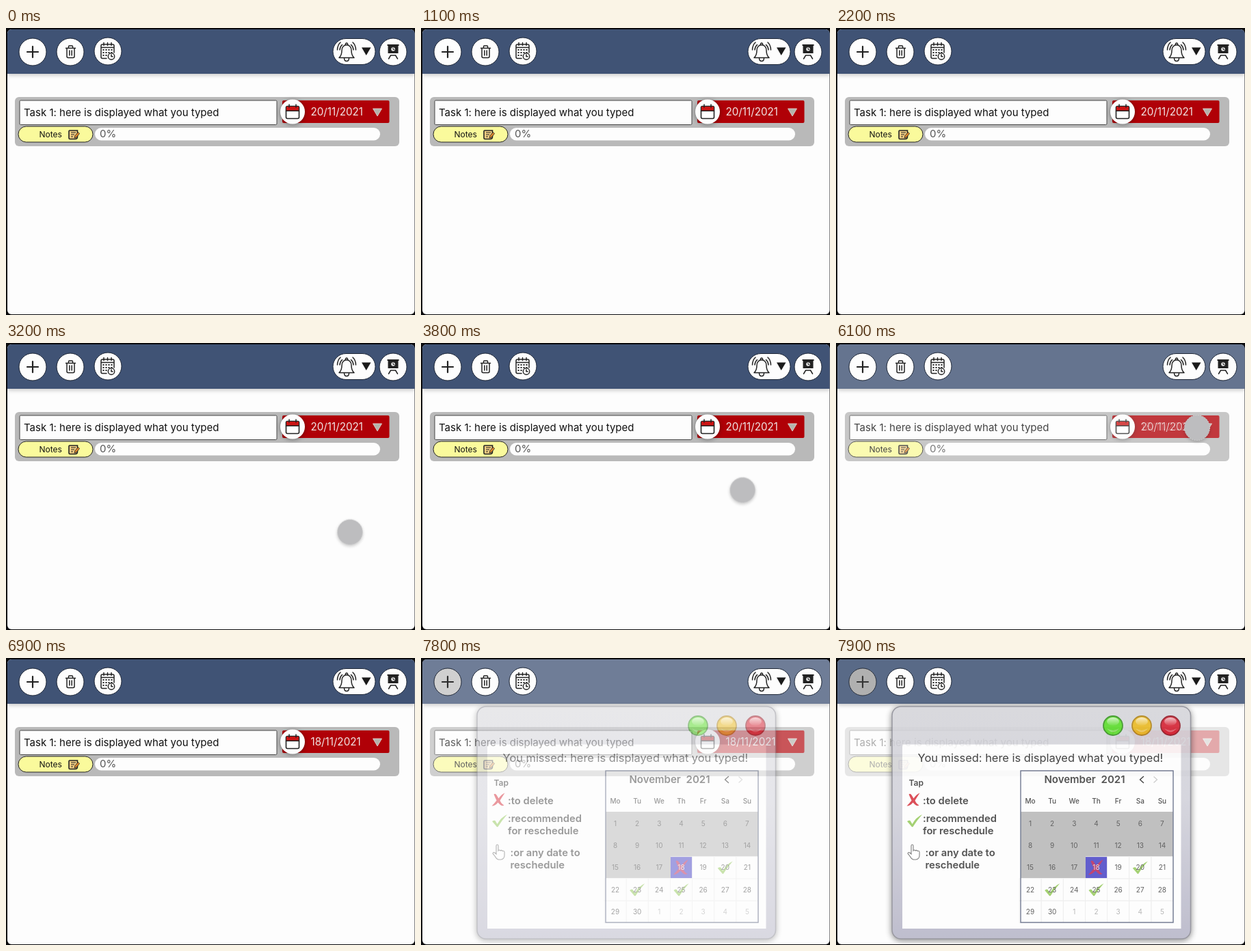
Animation of 598 by 420 pixels, one loop 8000 ms. Source, as an HTML page:

```html
<!DOCTYPE html>
<html lang="en">
<head>
<meta charset="utf-8">
<title>Task planner</title>
<style>
  html, body { margin: 0; width: 100%; height: 100%; overflow: hidden; background: #0b0b0d; }
  svg { display: block; width: 598px; height: 420px; font-family: Inter, Roboto, sans-serif; }
  .line { fill: none; stroke: #222; stroke-width: 1.5; stroke-linecap: round; stroke-linejoin: round; }
  .button { fill: #fdfdfd; stroke: #1d2636; stroke-width: 1; }
  .bar { filter: drop-shadow(0 2px 3px rgba(0, 0, 0, .22)); }
  .raised { filter: drop-shadow(0 1px 3px rgba(0, 0, 0, .4)); }
  .modal { filter: drop-shadow(0 2px 5px rgba(0, 0, 0, .55)); }
  .cursor { filter: drop-shadow(0 2px 2px rgba(0, 0, 0, .2)); }
</style>
</head>
<body>
<svg id="stage" viewBox="0 0 598 420">
  <defs>
    <clipPath id="page"><rect x="2" y="2" width="595.5" height="417" rx="6"/></clipPath>
    <linearGradient id="frame" x1="0" y1="0" x2="0" y2="1">
      <stop offset="0" stop-color="#d2d2d7"/>
      <stop offset=".4" stop-color="#cfcfd8"/>
      <stop offset="1" stop-color="#b3b2c5"/>
    </linearGradient>
    <linearGradient id="gloss" x1="0" y1="0" x2="0" y2="1">
      <stop offset="0" stop-color="#fff" stop-opacity=".7"/>
      <stop offset="1" stop-color="#fff" stop-opacity=".05"/>
    </linearGradient>
  </defs>
</svg>
<script>
const LOOP = 8000;
const stage = document.getElementById('stage');

const text = (x, y, size, str, attrs = '') =>
  `<text x="${x}" y="${y}" font-size="${size}" ${attrs}>${str}</text>`;
const rect = (x, y, w, h, attrs = '') =>
  `<rect x="${x}" y="${y}" width="${w}" height="${h}" ${attrs}/>`;
const circle = (x, y, r, attrs = '') => `<circle cx="${x}" cy="${y}" r="${r}" ${attrs}/>`;
const path = (d, attrs = 'class="line"') => `<path d="${d}" ${attrs}/>`;
const at = (x, y, body, scale = 1) => `<g transform="translate(${x} ${y}) scale(${scale})">${body}</g>`;

const cross = (x, y, s, color) => at(x, y,
  path('M-7 -8 Q-5 -10 -3 -7 L0 -2 Q4 -8 9 -10 Q5 -4 2 1 Q4 6 8 8 Q5 10 2 7 L-1 4 Q-5 9 -10 9 Q-6 5 -3 1 Q-5 -3 -7 -8Z',
    `fill="${color}"`), s);
const tick = (x, y) => at(x, y,
  path('M-11 1 Q-8 -1 -6.5 0 L-3.5 5 Q2 -5 11 -9 Q3 0 -2.5 9 Q-4 10 -5 8 Z', 'fill="#94c95a"'));

function trashIcon() {
  return path('M87.5 29.5H101.5M91.5 29V27Q91.5 26 92.5 26H96.5Q97.5 26 97.5 27V29' +
    'M89 29.5V41.5Q89 43.5 91 43.5H98Q100 43.5 100 41.5V29.5M92.8 33V40M96.2 33V40');
}

function scheduleIcon() {
  let dots = '';
  for (let row = 0; row < 3; row++)
    for (let col = 0; col < 4; col++)
      if (row < 2 || col < 2) dots += rect(141.5 + col * 4, 31 + row * 4, 2, 2, 'fill="#222"');
  return path('M147 44.5H141Q139 44.5 139 42.5V26Q139 24 141 24H156Q158 24 158 26V36M139 28.5H158M143 21.5V25.5M148.5 21.5V25.5M154 21.5V25.5') +
    dots + circle(154, 41.5, 4.7, 'fill="#fdfdfd" stroke="#222" stroke-width="1.4"') +
    path('M154 39V41.7H156');
}

function bellIcon() {
  return path('M487 43.5Q491 40 491 33C491 22 505 22 505 33Q505 40 509 43.5ZM496.3 25Q496.3 22 498 22Q499.7 22 499.7 25' +
    'M494.5 44Q494.5 48.5 498 48.5Q501.5 48.5 501.5 44M489 21Q484.7 25 484.5 32M491.5 24.5Q488.3 27.5 488 32' +
    'M507 21Q511.3 25 511.5 32M504.5 24.5Q507.7 27.5 508 32');
}

function boardIcon() {
  return rect(557.5, 24, 17, 2, 'fill="#222"') + rect(558.5, 25, 15, 12, 'fill="#222"') +
    circle(566, 31, 2.8, 'fill="#eee"') + path('M566 29V31.5H568', 'fill="none" stroke="#222"') +
    path('M563 40H569M562.5 40L559.5 45M569.5 40L572.5 45');
}

const headerBar = () => `<g class="bar">${rect(2, 2, 596, 65, 'fill="#405375"')}</g>`;

function headerButtons() {
  return circle(39, 35, 20, 'class="button"') +
    path('M39 27V43M31 35H47', 'stroke="#222" stroke-width="2.2" stroke-linecap="round"') +
    circle(94, 35, 20, 'class="button"') + trashIcon() +
    circle(149, 34, 20, 'class="button"') + scheduleIcon() +
    rect(478, 15.5, 62, 38, 'rx="19" class="button"') + bellIcon() +
    path('M520 28.5H533.5L526.7 40Z', 'fill="#1a1a1a"') +
    circle(566, 35, 20, 'class="button"') + boardIcon();
}

function notesButton() {
  return rect(18, 144, 109, 23, 'rx="11.5" fill="#fafa9c" stroke="#222"') +
    text(48.5, 160, 12, 'Notes', 'fill="#111"') +
    path('M104 150H93Q92 150 92 151V161Q92 162.5 93.5 162.5H101Q104.5 162.5 104.5 159V150Z',
      'fill="#f3cf83" stroke="#222" stroke-width="1.6"') +
    path('M95 153H102M95 156H100M95 159H98', 'stroke="#222" stroke-width="1.2"') +
    path('M100 161L101 157.5L105.5 152.5L107.5 154.5L103 160Z', 'fill="#e58a2c" stroke="#222" stroke-width=".9"');
}

function dateIcon() {
  return `<g class="raised">${circle(419, 122.5, 18, 'fill="#fdfdfd"')}</g>` +
    rect(409.5, 114.5, 19, 18, 'rx="2" fill="#fff" stroke="#222" stroke-width="1.6"') +
    rect(410, 115, 18, 6, 'fill="#cc1414"') +
    path('M409.5 121.3H428.5M414 112V116M424 112V116');
}

function taskCard(date) {
  return rect(13, 101, 562, 72, 'rx="6" fill="#b9b9b9"') +
    rect(20, 106, 376, 35.5, 'rx="1.5" fill="#fdfdfd" stroke="#444"') +
    text(26, 129.3, 15, 'Task 1: here is displayed what you typed', 'fill="#111"') +
    rect(404, 106, 156.5, 33, 'rx="2" fill="#b00007"') + dateIcon() +
    text(445.5, 127.8, 15.2, date, 'fill="#f0e4e4"') +
    path('M536.5 118H549.5L543 129Z', 'fill="#b4b4ac" stroke="#e8d8d8" stroke-width=".8"') +
    notesButton() +
    rect(130, 146, 417, 18.5, 'rx="9.2" fill="#fdfdfd"') +
    text(137, 160.3, 15, '0%', 'fill="#555"');
}

function ball(x, fill, edge) {
  return circle(x, 99, 14, `fill="${fill}" stroke="${edge}" stroke-width="1.8"`) +
    `<ellipse cx="${x}" cy="93" rx="9" ry="6" fill="url(#gloss)"/>` +
    path(`M${x - 9} 103Q${x} 114 ${x + 9} 103Q${x} 109 ${x - 9} 103Z`, 'fill="#fff" fill-opacity=".3"');
}

function calendar() {
  const colX = c => 284 + c * 32.15;
  const rowY = r => 242 + r * 32.3;
  const middle = 'text-anchor="middle"';
  let out = rect(270, 165, 223, 222, 'fill="#fdfdfd"') +
    rect(270, 225, 223, 65.5, 'fill="#b5b5b5"') + rect(270, 290, 95, 32, 'fill="#b5b5b5"') +
    text(363.5, 183.3, 15, 'November 2021', `${middle} font-weight="600" word-spacing="4" fill="#333"`) +
    path('M449.5 173.5L444.5 178L449.5 182.5') +
    path('M464.5 173.5L469.5 178L464.5 182.5', 'fill="none" stroke="#c4c4c4" stroke-width="1.3"');
  ['Mo', 'Tu', 'We', 'Th', 'Fr', 'Sa', 'Su'].forEach((name, c) => {
    out += text(colX(c), 212.8, 10, name, `${middle} font-weight="500" fill="#333"`);
  });
  for (let i = 0; i < 35; i++) {
    const x = colX(i % 7), y = rowY(Math.floor(i / 7));
    const day = i % 30 + 1, picked = i === 17;
    if (i > 17) out += rect(x - 16, y - 16, 32.1, 32.3, 'fill="none" stroke="#ececec" stroke-width=".8"');
    if (picked) out += rect(x - 15.5, y - 15.5, 31.5, 31, 'fill="#4540c4"') + cross(x, y, 1.15, '#b52458');
    if (i === 19 || i === 22 || i === 24) out += tick(x, y);
    const color = picked ? '#ddd' : i > 29 ? '#aaa' : '#444';
    out += text(x, y + 3.7, 10, day, `${middle} fill="${color}"`);
  }
  return out + rect(270, 165, 223, 222, 'fill="none" stroke="#56607c" stroke-width="1.4"');
}

function handIcon() {
  return path('M110 287V275Q110 273 111.5 273Q113 273 113 275V282Q114.5 280 116 282Q118 280.5 119 282.5Q121.5 281.5 122 284V289Q122 294 117 295H113Q110 294 108 290L105 286Q105.5 283.5 108 285Z',
    'fill="#fff" stroke="#666" stroke-width="1.1"');
}

function missedModal() {
  const bold = 'font-weight="600" fill="#333"';
  return `<g class="modal">${rect(82, 71, 436.5, 340, 'rx="13" fill="url(#frame)" stroke="#85858f" stroke-width="1.5"')}</g>` +
    ball(405, '#4fd81c', '#2a8a14') + ball(447, '#e6b414', '#a87a0c') + ball(489, '#d01224', '#8a0c18') +
    rect(97, 126.5, 407.5, 269.5, 'fill="#fdfdfd"') +
    text(119.5, 152, 16.42, 'You missed: here is displayed what you typed!', 'fill="#222"') +
    text(106.5, 187, 12, 'Tap', bold) +
    cross(113.5, 207.5, 1, '#d6303c') + text(127, 214.3, 14.75, ':to delete', bold) +
    tick(115, 238) + text(127, 240.3, 14.75, ':recommended', bold) +
    text(127, 258.3, 14.75, 'for reschedule', bold) +
    handIcon() + text(130.5, 290.3, 14.75, ':or any date to', bold) +
    text(130.5, 308.3, 14.75, 'reschedule', bold) +
    calendar();
}

// Header bars and cards dissolve; the buttons stay put on top.
stage.insertAdjacentHTML('beforeend', `<g clip-path="url(#page)">
  ${rect(2, 2, 596, 418, 'fill="#fdfdfd"')}
  <g id="first">${headerBar()}${taskCard('20/11/2021')}</g>
  <g id="secondBar">${headerBar()}</g>
  <g id="secondCard">${taskCard('18/11/2021')}</g>
  <g id="missed">${headerBar()}${missedModal()}</g>
  ${headerButtons()}
  <g id="pressed">${circle(39, 35, 20, 'fill="#505050" fill-opacity=".52"')}</g>
  <g id="pointer"><circle class="cursor" r="18.5" fill="#bdbdbf" stroke="#d2d2d2" stroke-dasharray="2 1.5"/></g>
</g>`);

// Each step is [time in ms, value]; the easing runs towards the next step.
function play(id, steps, prop, format, easing) {
  const frames = steps.map(([ms, ...v]) => ({ offset: ms / LOOP, [prop]: format(...v), easing }));
  document.getElementById(id).animate(frames, { duration: LOOP, iterations: Infinity });
}
const fade = (id, steps, easing = 'ease-out') => play(id, steps, 'opacity', v => v, easing);

const shown = [[0, 0], [6050, 0], [6350, 1], [7700, 1], [8000, 0]];
const popup = [[0, 0], [7700, 0], [8000, 1]];
fade('first', [[0, 1], [6050, 1], [6350, 0], [8000, 0]]);
fade('secondBar', shown);
fade('secondCard', shown, 'linear');
fade('missed', popup);
fade('pressed', popup);

play('pointer', [
  [0, 630, 445], [2980, 630, 445], [3200, 503, 277], [3500, 474, 205], [3800, 470, 215],
  [4050, 505, 285], [4300, 630, 445], [5400, 630, 445], [5700, 560, 215], [5900, 528, 124],
  [6150, 528, 124], [6400, 630, 124], [8000, 630, 445]
], 'transform', (x, y) => `translate(${x}px, ${y}px)`, 'linear');
</script>
</body>
</html>
```
